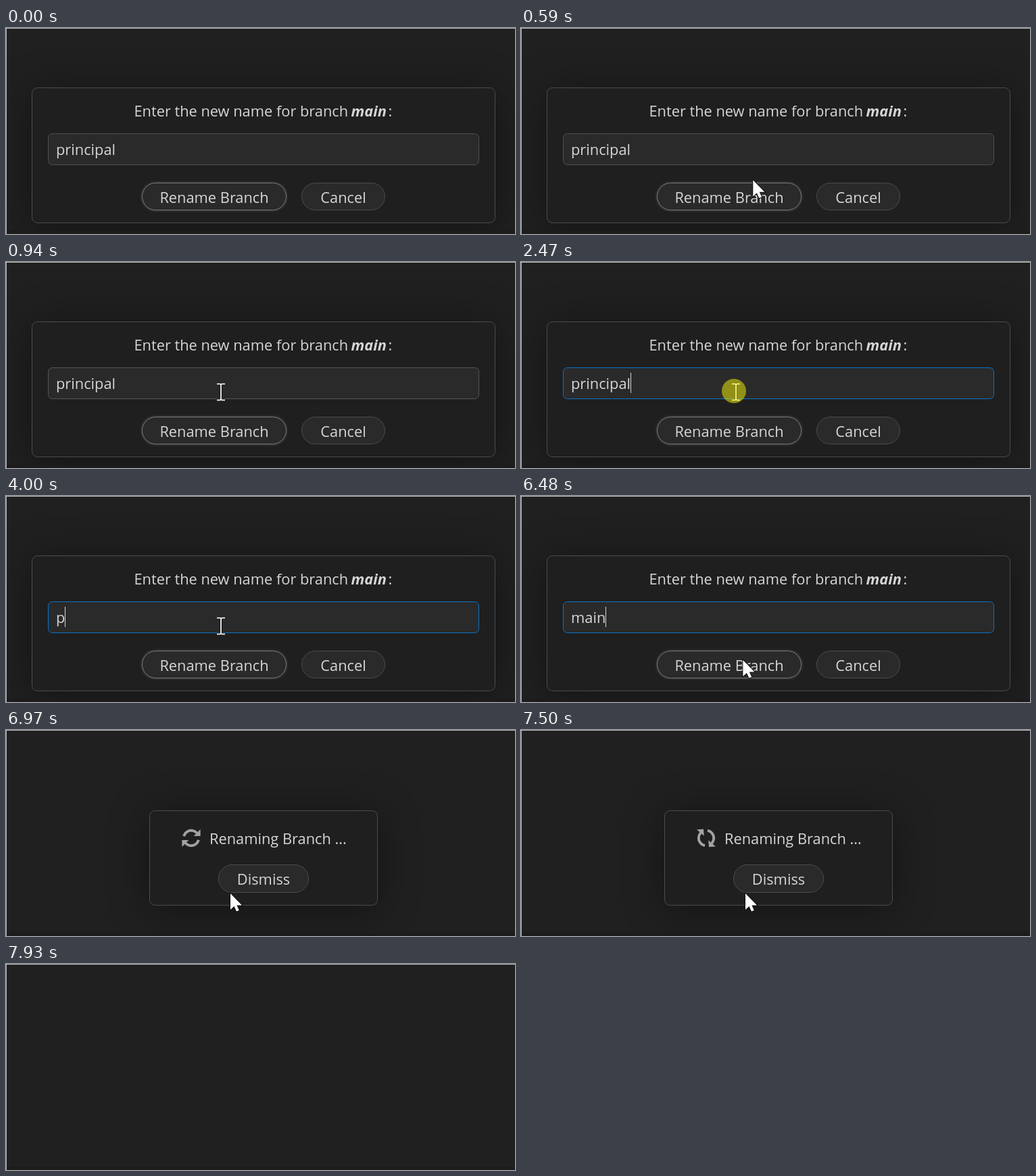
Animation, 753 px wide and 305 px high, one loop 9.19 s. Source, as an HTML page with a canvas:

```html
<!DOCTYPE html>
<html lang="en">
<head>
<meta charset="utf-8">
<title>Rename branch</title>
<style>
  html, body { margin: 0; width: 100%; height: 100%; overflow: hidden; background: #202020; }
  canvas { display: block; }
</style>
</head>
<body>
<canvas id="stage" width="753" height="305"></canvas>
<script>
const ctx = document.getElementById('stage').getContext('2d');
const LOOP = 9190;
const FONT = '21.8px "Open Sans", "Noto Sans", sans-serif';
const TEXT = '#d6d6d6';

const DELETE_TIMES = [3160, 3280, 3470, 3570, 3670, 3810, 3930, 4000, 4070];
const TYPE_TIMES = [4950, 5080, 5140, 5280];
const CARET_SPANS = [[2470, 3010], [3470, 4070], [4610, 5800], [6320, 6810]];
const CLICK_SPANS = [[2470, 2590], [6810, 6890]];

const within = (t, from, to) => t >= from && t < to;
const inAny = (t, spans) => spans.some(([from, to]) => within(t, from, to));
const passed = (t, times) => times.filter(time => t >= time).length;
const easeOut = u => 1 - (1 - u) ** 2;
const easeIn = u => u * u;
const smooth = u => u * u * (3 - 2 * u);

// Progress from 0 to 1, held on a number of poses like a screen recording.
function stepped(t, from, to, poses) {
  const u = Math.min(1, Math.max(0, (t - from) / (to - from)));
  return Math.floor(u * (poses - 1) + 1e-6) / (poses - 1);
}

const mix = ([x0, y0], [x1, y1], u) => [x0 + (x1 - x0) * u, y0 + (y1 - y0) * u];

function box(x, y, w, h, radius, fill, stroke) {
  ctx.beginPath();
  ctx.roundRect(x + .5, y + .5, w - 1, h - 1, radius);
  ctx.fillStyle = fill;
  ctx.fill();
  ctx.shadowColor = 'transparent';
  ctx.strokeStyle = stroke;
  ctx.lineWidth = 1;
  ctx.stroke();
}

function label(text, x, y, align = 'left', font = FONT) {
  ctx.font = font;
  ctx.textAlign = align;
  ctx.fillStyle = TEXT;
  ctx.fillText(text, x, y);
}

function dialog(x, y, w, h) {
  ctx.save();
  ctx.shadowColor = 'rgba(0,0,0,.4)';
  ctx.shadowBlur = 60;
  ctx.shadowOffsetY = 6;
  box(x, y, w, h, 8, '#1f1f1f', '#4c4c4c');
  ctx.restore();
}

function button(text, x, y, w, h, primary, opacity = 1) {
  ctx.save();
  ctx.globalAlpha = opacity;
  if (primary) {
    ctx.shadowColor = 'rgba(150,150,150,.55)';
    ctx.shadowBlur = 4;
  }
  box(x, y, w, h, h / 2 - .5, '#2a2a2a', primary ? '#787878' : '#4c4c4c');
  label(text, x + w / 2, y + 30, 'center');
  ctx.restore();
}

function renameDialog(t) {
  dialog(38, 88, 686, 201);
  label('Enter the new name for branch', 189.5, 131);
  label('main', 510.5, 131, 'left', 'italic bold ' + FONT);
  label(':', 565.5, 131);

  const focused = within(t, 2470, 6810);
  box(62, 156, 638, 47, 6, '#2a2a2a', focused ? '#0b74c8' : t < 860 ? '#4f4f4f' : '#565656');
  const value = t < TYPE_TIMES[0]
    ? 'principal'.slice(0, 9 - passed(t, DELETE_TIMES))
    : 'main'.slice(0, passed(t, TYPE_TIMES));
  label(value, 74, 188);
  if (inAny(t, CARET_SPANS)) {
    ctx.fillRect(Math.floor(74 + ctx.measureText(value).width), 164, 1, 30);
  }

  const disabled = stepped(t, 4070, 4210, 3) - stepped(t, 4950, 5140, 4);
  button('Rename Branch', 201, 229, 214, 41, true, 1 - .5 * disabled);
  button('Cancel', 437, 229, 124, 41, false);
}

function spinner(x, y, angle) {
  ctx.save();
  ctx.translate(x, y);
  ctx.rotate(angle);
  ctx.strokeStyle = ctx.fillStyle = '#a2a2a2';
  ctx.lineWidth = 3.8;
  for (let half = 0; half < 2; half++) {
    ctx.beginPath();
    ctx.arc(0, 0, 11.2, Math.PI * 1.08, Math.PI * 1.77);
    ctx.stroke();
    ctx.beginPath();
    ctx.moveTo(13.6, -13);
    ctx.lineTo(13.6, -3);
    ctx.lineTo(3.6, -3);
    ctx.fill();
    ctx.rotate(Math.PI);
  }
  ctx.restore();
}

function progressDialog(t) {
  dialog(212, 119, 338, 141);
  spinner(274, 160, Math.floor((t - 6970) / 68) * 68 / 2000 * 2 * Math.PI);
  label('Renaming Branch ...', 301, 169);
  button('Dismiss', 314, 199, 134, 42, false);
}

function cursorPosition(t) {
  const rest = [318, 192], onButton = [329, 246], clicked = [332, 242];
  if (t < 6130) return mix([400, 300], rest, easeOut(stepped(t, 250, 940, 10)));
  if (t < 6810) return mix(rest, onButton, smooth(stepped(t, 6060, 6540, 8)));
  return mix(clicked, [696, 290], easeIn(stepped(t, 7580, 7860, 5)));
}

function textCursor(x, y) {
  const path = new Path2D(
    'M-6-11.5h4q2 0 2 2q0-2 2-2h4 M0-9.5v20 M-6 12.5h4q2 0 2-2q0 2 2 2h4');
  ctx.save();
  ctx.translate(x, y);
  for (const [width, color] of [[4, '#151515'], [2, '#e4e4e4']]) {
    ctx.lineWidth = width;
    ctx.strokeStyle = color;
    ctx.stroke(path);
  }
  ctx.restore();
}

function arrowCursor(x, y) {
  const path = new Path2D('M0 0V24L5.5 19L9 26.5L12.8 25L9.4 17.5H17Z');
  ctx.save();
  ctx.translate(x, y);
  ctx.lineWidth = 2;
  ctx.strokeStyle = '#111';
  ctx.stroke(path);
  ctx.fillStyle = '#fff';
  ctx.fill(path);
  ctx.restore();
}

function pointer(t) {
  const [x, y] = cursorPosition(t);
  const overInput = t < 6810 && y > 156 && y < 203;
  (overInput ? textCursor : arrowCursor)(x, y);
  if (inAny(t, CLICK_SPANS)) {
    ctx.beginPath();
    ctx.arc(x - (overInput ? 3 : 0), y - (overInput ? 1 : 0), 18, 0, 2 * Math.PI);
    ctx.fillStyle = 'rgba(242,238,10,.52)';
    ctx.fill();
  }
}

function draw(t) {
  ctx.fillStyle = '#202020';
  ctx.fillRect(0, 0, 753, 305);
  if (t < 6970) renameDialog(t);
  else if (t < 7770) progressDialog(t);
  ctx.fillStyle = '#1e1b1d';
  ctx.fillRect(0, 300, 753, 5);
  if (within(t, 250, 7930)) pointer(t);
  ctx.fillStyle = '#b8b8b8';
  ctx.fillRect(0, 0, 753, 1);
  ctx.fillRect(0, 0, 1, 305);
}

const start = performance.now();
function frame() {
  draw((performance.now() - start) % LOOP);
  requestAnimationFrame(frame);
}
frame();
</script>
</body>
</html>
```
